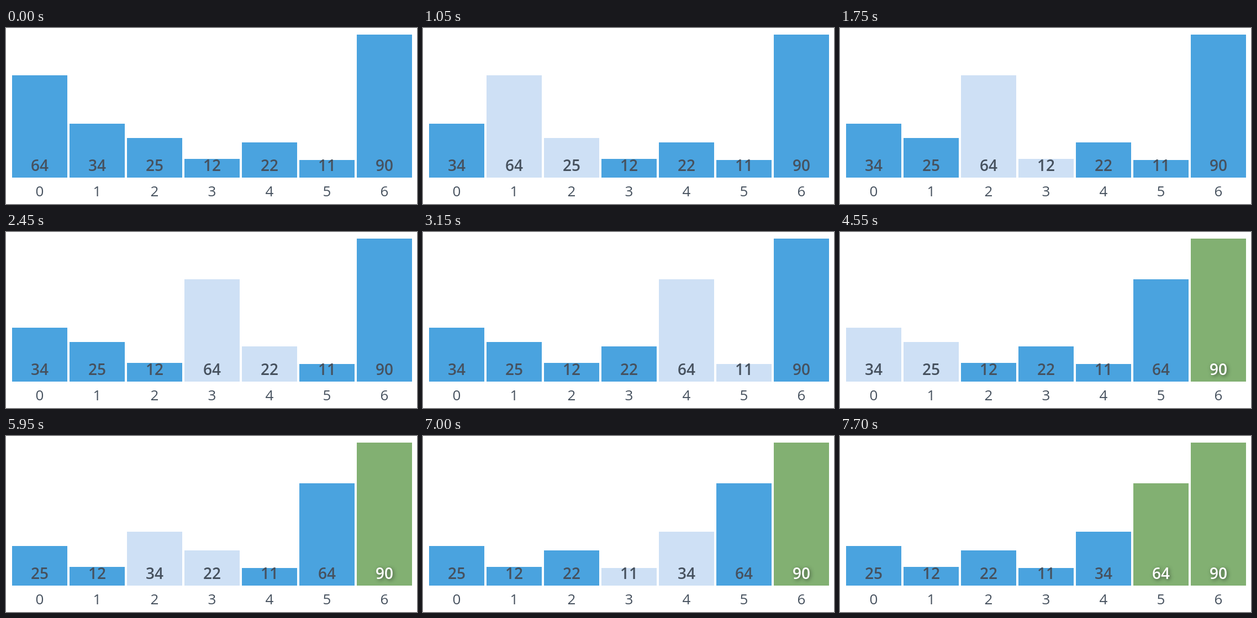
An HTML page for the animation above (8000 ms loop, 744 by 320 pixels).

```html
<!DOCTYPE html>
<html lang="en">
<head>
<meta charset="utf-8">
<title>Bubble sort</title>
<style>
  html, body { margin: 0; width: 100%; height: 100%; overflow: hidden; background: #fff; }
  #chart { position: relative; width: 744px; height: 320px; font-family: "Open Sans", "Noto Sans", sans-serif; }
  svg { position: absolute; left: 0; top: 0; display: block; }
  text { text-anchor: middle; fill: #46515e; }
  .bar { fill: #4aa3df; }
  .value { font-size: 28px; font-weight: 600; }
  .index { font-size: 26px; }
  .active .bar { fill: #cee0f5; }
  .sorted .bar { fill: #82b072; }
  .sorted .value { fill: #fff; text-shadow: 2px 2px 6px rgba(40, 50, 40, .7); }
</style>
</head>
<body>
<div id="chart"><svg width="744" height="320" viewBox="0 0 744 320"></svg></div>
<script>
  const LOOP = 8000, STEP = 350, BASE = 272;
  const START = [64, 34, 25, 12, 22, 11, 90];
  const HEIGHTS = { 64: 186, 34: 98, 25: 72, 12: 34, 22: 64, 11: 32, 90: 260 };

  // Every visible state of the bubble sort, in order
  function sortSteps(values) {
    const list = [...values], steps = [];
    let sortedFrom = list.length;
    const save = active => steps.push({ list: [...list], active, sortedFrom });
    save(-1);
    while (sortedFrom > 1) {
      for (let i = 0; i < sortedFrom - 1; i++) {
        save(i);
        if (list[i] > list[i + 1]) {
          [list[i], list[i + 1]] = [list[i + 1], list[i]];
          save(i);
        }
      }
      sortedFrom--;
      save(-1);
    }
    return steps;
  }

  function add(parent, tag, attrs, text = "") {
    const el = document.createElementNS("http://www.w3.org/2000/svg", tag);
    for (const key in attrs) el.setAttribute(key, attrs[key]);
    el.textContent = text;
    return parent.appendChild(el);
  }

  const svg = document.querySelector("svg");
  const columns = START.map((_, i) => {
    const x = 11 + 104 * i;
    const group = add(svg, "g", {});
    const bar = add(group, "rect", { class: "bar", x, width: 100 });
    const value = add(group, "text", { class: "value", x: x + 50, y: 260 });
    add(group, "text", { class: "index", x: x + 50, y: 306 }, i);
    return { group, bar, value };
  });

  function render({ list, active, sortedFrom }) {
    columns.forEach(({ group, bar, value }, i) => {
      const height = HEIGHTS[list[i]];
      const isActive = active >= 0 && (i === active || i === active + 1);
      bar.setAttribute("y", BASE - height);
      bar.setAttribute("height", height);
      value.textContent = list[i];
      group.setAttribute("class", i >= sortedFrom ? "sorted" : isActive ? "active" : "");
    });
  }

  const steps = sortSteps(START);
  const start = performance.now();
  let shown = -1;

  function tick() {
    const time = (performance.now() - start) % LOOP;
    const step = Math.floor(time / STEP);
    if (step !== shown) render(steps[shown = step]);
    requestAnimationFrame(tick);
  }
  tick();
</script>
</body>
</html>
```
